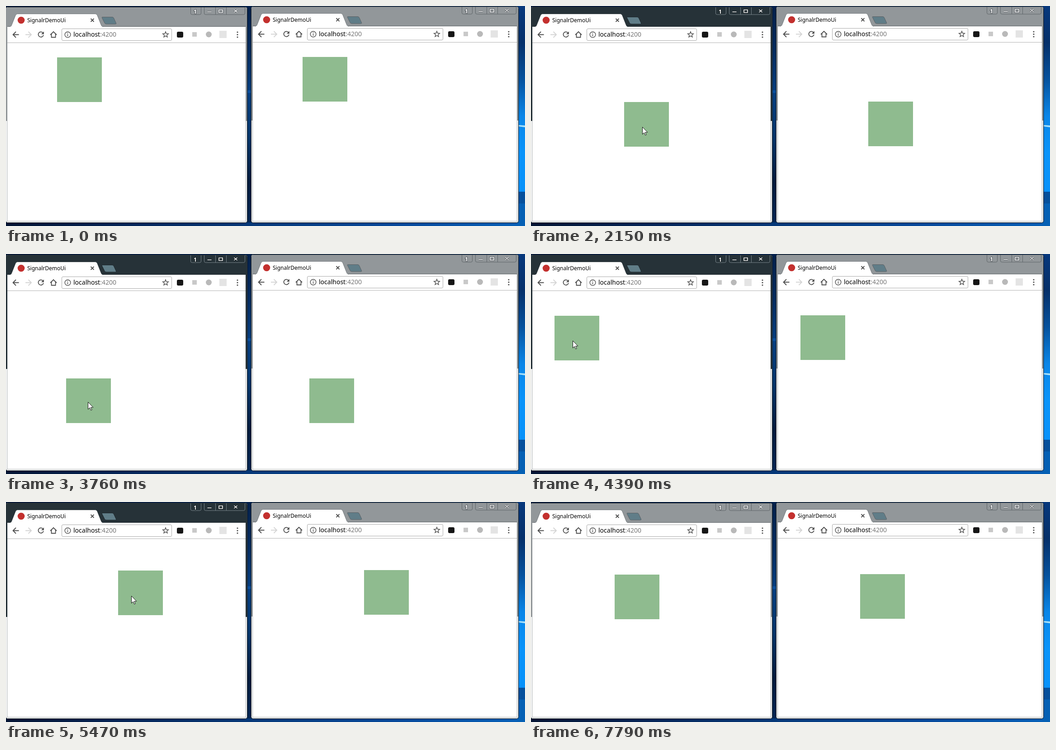
These frames come from a looping animation (1148 by 488 pixels, 7.96 s). An HTML page:

```html
<!DOCTYPE html>
<html lang="en">
<head>
<meta charset="utf-8">
<title>Shared box demo</title>
<style>
  html, body { margin: 0; width: 100%; height: 100%; overflow: hidden; background: #04204a; }
  svg { display: block; width: 1148px; height: 488px; }
  text { font-family: "Noto Sans", "Open Sans", sans-serif; }
  .win { --bar: #92979a; --edge: #5c6165; --key: #5e6468; --rim: #50555a; }
  .active { --bar: #263238; --edge: #1e282d; --key: #78848a; --rim: #11191c; }
  .bar { fill: var(--bar); }
  .key { fill: none; stroke: var(--key); }
  .glyph { fill: none; stroke: #fff; stroke-width: 1.6; }
  .rim { fill: none; stroke: var(--rim); stroke-width: 3.4; }
  .icon { fill: none; stroke: #4d4d4d; stroke-width: 1.8; }
  .thin { stroke-width: 1.4; }
  .off { stroke: #d4d4d4; }
  .crisp { shape-rendering: crispEdges; }
</style>
</head>
<body>
<svg id="stage" viewBox="0 0 1148 488"></svg>
<script>
const LOOP = 7960, GRAB = 1130, TICK = 77.4;
const LAG = 10, AHEAD = 20;

// Turning points: time, x, y
const drag = [
  [1120, 113, 115], [1900, 145, 209], [2140, 207, 213], [2560, 306, 150],
  [2960, 215, 126], [3220, 137, 135], [3480, 93, 225], [3640, 115, 279],
  [4000, 362, 190], [4381, 52, 137], [4640, 341, 150], [5080, 91, 163],
  [5440, 250, 152], [5700, 152, 164], [5760, 185, 161]
];
const arrive = [[120, 752, 469], [670, 136, 168], [820, 136, 168], [900, 148, 170]];
const leave = [[6160, 220, 216], [6395, 612, 354]];

// Smooth curve through the points that never overshoots them
function along(points, t) {
  const last = points.length - 1;
  if (t <= points[0][0]) return points[0].slice(1);
  if (t >= points[last][0]) return points[last].slice(1);
  const i = points.findIndex(p => p[0] > t) - 1;
  const span = points[i + 1][0] - points[i][0];
  const u = (t - points[i][0]) / span;

  return [1, 2].map(axis => {
    const rate = k => (points[k + 1][axis] - points[k][axis]) / (points[k + 1][0] - points[k][0]);
    const slope = k => {
      if (k === 0 || k === last) return rate(Math.min(k, last - 1));
      const a = rate(k - 1), b = rate(k);
      return a * b > 0 ? 2 * a * b / (a + b) : 0;
    };
    const a = points[i][axis], b = points[i + 1][axis];
    const ease = u * u * (3 - 2 * u);
    const bend = u * (1 - u) * span * ((1 - u) * slope(i) - u * slope(i + 1));
    return Math.round(a + (b - a) * ease + bend);
  });
}

const boxAt = t => t < GRAB - LAG ? [113, 114] : along(drag, t);

function pointerAt(t) {
  if (t < 120 || t > 6460) return null;
  if (t < GRAB) return along(arrive, t);
  if (t > 6160) return along(leave, t);
  const [x, y] = along(drag, t + AHEAD);
  return [x + 35, y + 55];
}

const rect = (x, y, w, h, fill, more = "") =>
  `<rect x="${x}" y="${y}" width="${w}" height="${h}" fill="${fill}" ${more}/>`;
const path = (d, more) => `<path d="${d}" ${more}/>`;
const disc = (x, y, r, more) => `<circle cx="${x}" cy="${y}" r="${r}" ${more}/>`;

// Evenly spaced colours, left to right or top to bottom
const gradient = (id, end, colors) =>
  `<linearGradient id="${id}" x2="${end[0]}" y2="${end[1]}">` + colors.map((color, i) =>
    `<stop offset="${i / (colors.length - 1)}" stop-color="${color}"/>`).join("") +
  `</linearGradient>`;

const desktop = `<defs>` +
  gradient("sky", [1, 0], ["#04183c", "#042654", "#073a7d"]) +
  gradient("gap", [0, 1], ["#04204a", "#052c60", "#063f82", "#053468", "#031a3c", "#042654"]) +
  gradient("side", [0, 1],
    ["#07387c", "#05306a", "#05529e", "#0a86e8", "#0a94fa", "#0892fa", "#0878d8"]) +
  gradient("floor", [1, 0], ["#031433", "#04265a", "#053a7c", "#06489a", "#0560b8"]) +
  `</defs>` +
  rect(0, 0, 1148, 488, "url(#sky)") +
  rect(533, 0, 12, 488, "url(#gap)") +
  rect(533, 187, 12, 6, "#0a4f9e") +
  rect(0, 480, 1148, 8, "url(#floor)") +
  rect(1133, 0, 15, 488, "url(#side)") +
  rect(1133, 412, 15, 26, "#06509c") +
  rect(1133, 438, 15, 50, "#0560b4") +
  path("M1133 264l15 1v4l-15-2z", `fill="#a9e2fa"`);

const star = Array.from({ length: 10 }, (_, i) => {
  const a = i * Math.PI / 5 - Math.PI / 2, r = i % 2 ? 2.9 : 6.6;
  return `${(353 + r * Math.cos(a)).toFixed(1)},${(63.6 + r * Math.sin(a)).toFixed(1)}`;
}).join(" ");

function frame(w, bottom) {
  return rect(-1.5, 1.5, w + 3, bottom, "none", `rx="5" stroke="#000" stroke-opacity=".3"`) +
    rect(-.5, 2.5, w + 1, bottom - 2, "#fff", `rx="4" stroke="#2c343a"`) +
    path(`M0 255V6q0-3 3-3h${w - 6}q3 0 3 3V255z`, `class="bar"`) +
    rect(3, 45, w - 6, bottom - 48, "#fff") +
    `<g class="crisp">` +
    [2, w - 3].map(x => rect(x, 255, 1, bottom - 257, "#a5aaac")).join("") +
    rect(2, bottom - 3, w - 4, 1, "#a5aaac") +
    rect(3, 45, w - 6, 1, "var(--edge)") +
    rect(3, 81, w - 6, 1, "#b3b3b3") + `</g>`;
}

function tab() {
  return path("M9.5 46q2-.5 3-3.500l8.500-21.500q1.500-3.500 4.500-3.500h172q3 0 4.500 3.500l8.500 21.500q1 3 3.500 3.500z",
      `fill="#fff" stroke="var(--edge)" stroke-opacity=".7"`) +
    rect(10, 45, 203, 2, "#fff") +
    path("M213 24.500h22q2.500 0 3.500 2.500l5 11q1 2-1.500 2h-20q-3 0-4-2.500l-5.500-11q-1-2 .5-2z",
      `fill="#607d88" stroke="var(--edge)"`) +
    disc(33.5, 31.5, 7.8, `fill="#c3302e"`) +
    `<text x="47" y="36" font-size="12" fill="#000">SignalrDemoUi</text>` +
    path("M187.500 28l7 7m0-7l-7 7", `class="icon"`);
}

function toolbar(grow) {
  return path("M28.500 63.500h-13M22 57l-6.500 6.500 6.500 6.500", `class="icon"`) +
    path("M43 63.500h13M49.500 57l6.500 6.500-6.500 6.500", `class="icon off"`) +
    path("M81.800 59.500a5.800 5.800 0 1 0 1.100 5", `class="icon"`) +
    path("M83.800 56.500v6h-6z", `fill="#4d4d4d"`) +
    path("M98 64l7-7 7 7M100.500 62v7.500h9V62", `class="icon"`) +
    rect(123.5, 50.5, 243 + grow, 26, "#fff", `rx="2.500" stroke="#a9a9a9"`) +
    disc(136.5, 63.5, 6.3, `class="icon thin"`) +
    path("M136.500 62.500v4.500m0-7.500v1.700", `class="icon thin"`) +
    `<text x="149" y="68" font-size="14" fill="#000">localhost<tspan fill="#777">:4200</tspan></text>`;
}

// Parts that keep their distance to the right edge
function rightSide(grow) {
  const keys = "M408.5 3v13q0 3 3 3h17q3 0 3-3V3M438.5 3v13q0 3 3 3h84q3 0 3-3V3M463.5 3v16m24-16v16";
  const marks = "M445.5 13h9M471 8.500h8v6h-8zM504.500 8l7 6m0-6l-7 6";
  return `<g transform="translate(${grow} 0)">
      <polygon points="${star}" class="icon thin"/>` +
    rect(378, 57, 14, 13, "#161616", `rx="3"`) +
    rect(412, 58, 10, 10, "#c9c9c9") +
    disc(448.5, 63, 6.5, `fill="#b9b9b9"`) +
    rect(472, 55, 16, 16, "#e4e4e4") +
    [58, 63.5, 69].map(y => disc(512, y, 1.6, `fill="#4d4d4d"`)).join("") +
    path(keys, `class="key"`) + path(marks, `class="rim"`) + path(marks, `class="glyph"`) +
    `<text x="415" y="16.500" font-size="12" font-weight="600" fill="#fff" stroke="var(--rim)"
       stroke-width="2" paint-order="stroke">1</text></g>`;
}

const browser = (id, dx, dy, grow) =>
  `<g id="${id}" class="win" transform="translate(${dx} ${dy})">` +
  frame(533 + grow, 480 - dy) + tab() + toolbar(grow) + rightSide(grow) + `</g>`;

const square = id => rect(0, 0, 99, 99, "#8fbb8f", `id="${id}" class="crisp"`);

const stage = document.getElementById("stage");
stage.innerHTML = desktop +
  browser("leftWin", 0, 0, 0) + browser("rightWin", 543, -1, 57) +
  square("leftBox") + square("rightBox") +
  path("M.5.5v16l3.700-3.500 2.600 5.700 2.300-1-2.500-5.500h5.200z",
    `id="pointer" fill="#fff" stroke="#111"`);

const [leftWin, leftBox, rightBox, pointer] =
  ["leftWin", "leftBox", "rightBox", "pointer"].map(id => document.getElementById(id));

const place = (el, x, y) => el.setAttribute("transform", `translate(${x} ${y})`);

function draw() {
  // The screen refreshes in steady ticks
  const t = GRAB + Math.floor((performance.now() % LOOP - GRAB) / TICK) * TICK;
  const [x, y] = boxAt(t - LAG);
  const tip = pointerAt(t);
  place(leftBox, ...boxAt(t));
  place(rightBox, x + 543, y - 1);
  leftWin.classList.toggle("active", t >= GRAB && t < 7780);
  pointer.style.display = tip ? "" : "none";
  if (tip) place(pointer, ...tip);
  requestAnimationFrame(draw);
}
draw();
</script>
</body>
</html>
```
